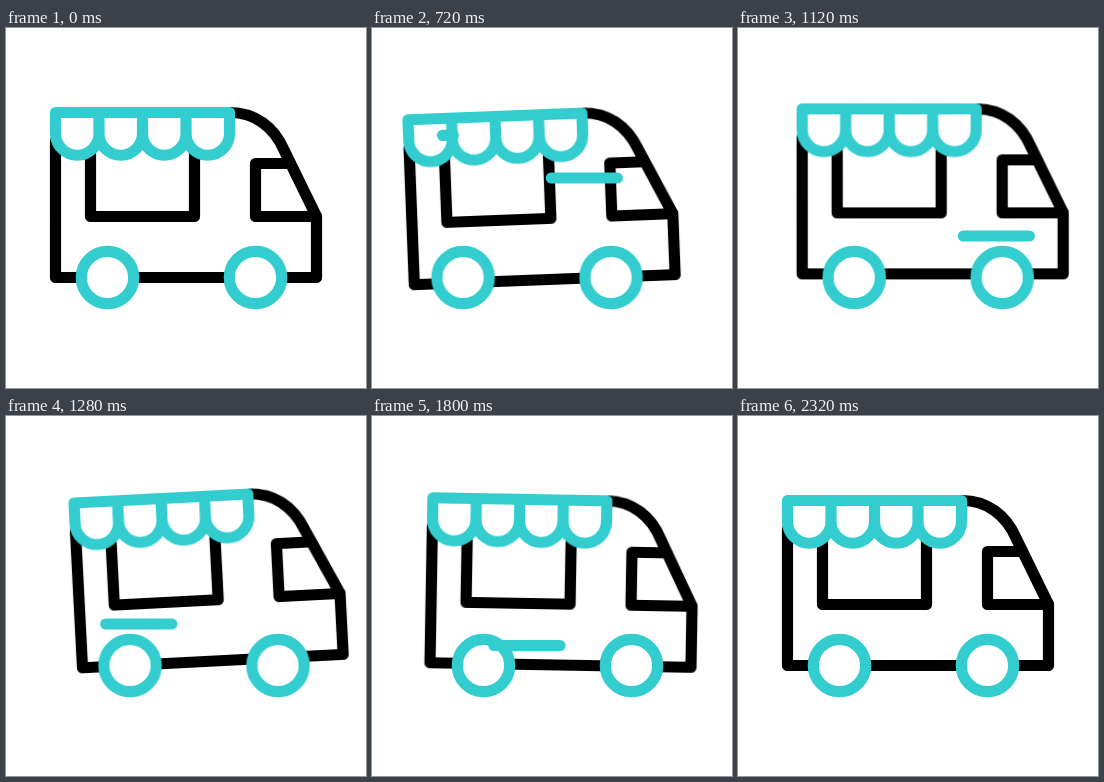
An HTML page without scripts that plays this animation: 360x360 px, repeating every 2.44 s.

```html
<!DOCTYPE html>
<html lang="en">
<head>
<meta charset="utf-8">
<title>Food truck</title>
<style>
  html, body { margin: 0; width: 100%; height: 100%; overflow: hidden; background: #fff; }
  svg { display: block; width: 100vw; height: 100vh; }
  svg * { stroke-width: 11.2; stroke-linecap: round; stroke-linejoin: round; }
  .ink { fill: none; stroke: #000; }
  .teal { fill: none; stroke: #33cdcf; }
  .wheel { fill: #fff; }

  .truck { animation: drive 2440ms cubic-bezier(.37, 0, .63, 1) infinite; }
  .body { transform-origin: 180px 166px; animation: rock 2440ms ease-in-out infinite; }
  .wind path {
    stroke-dasharray: 66 1000;
    stroke-dashoffset: 67;
    animation: gust 2440ms linear var(--at) infinite;
  }

  /* back up, lunge forward, settle */
  @keyframes drive {
    0%, 9.836% { transform: translateX(0); }
    25.41% { transform: translateX(-12px); }
    56.557% { transform: translateX(24px); }
    87.705%, 100% { transform: translateX(0); }
  }
  @keyframes rock {
    0%, 9.836% { transform: translateY(0) rotate(0deg); }
    16.393% { transform: translateY(3.4px) rotate(-2deg); animation-timing-function: ease-out; }
    26.23% { transform: translateY(3px) rotate(-3deg); }
    39.344% { transform: translateY(-2.9px) rotate(3deg); }
    52.459% { transform: translateY(-4.3px) rotate(-2.95deg); }
    65.574% { transform: translateY(.5px) rotate(1deg); }
    75.41% { transform: translateY(-.5px) rotate(1deg); }
    81.967% { transform: translateY(.1px) rotate(.45deg); animation-timing-function: ease-out; }
    87.705%, 100% { transform: translateY(0) rotate(0deg); }
  }
  /* a dash slides along its path, emerging right and vanishing left */
  @keyframes gust {
    0% { stroke-dashoffset: 67; }
    16.393%, 100% { stroke-dashoffset: -247; }
  }
</style>
</head>
<body>
<svg viewBox="0 0 360 360">
  <g class="truck">
    <g class="body">
      <g class="ink">
        <path d="M49.5 113V249.5H310.5V188.5L278 122C268 99 249 84.5 224 84.5"/>
        <path d="M284 135.5H249.5V188.5H310.5"/>
        <path d="M84.5 126V188.5H188.5V126"/>
      </g>
      <path class="teal" d="M49.5 84.5H223.5V105.5a21.75 21.75 0 0 1-43.5 0V84.5v21a21.75 21.75 0 0 1-43.5 0V84.5v21a21.75 21.75 0 0 1-43.5 0V84.5v21a21.75 21.75 0 0 1-43.5 0Z"/>
    </g>
    <circle class="teal wheel" cx="101.5" cy="249.5" r="26.2"/>
    <circle class="teal wheel" cx="249.5" cy="249.5" r="26.2"/>
  </g>
  <g class="teal wind">
    <path style="--at: 336ms" d="M316.5 107.3h-246"/>
    <path style="--at: 566ms" d="M300 150h-246"/>
    <path style="--at: 1017ms" d="M306 208h-246"/>
    <path style="--at: 1578ms" d="M296 229.5h-246"/>
  </g>
</svg>
</body>
</html>
```
